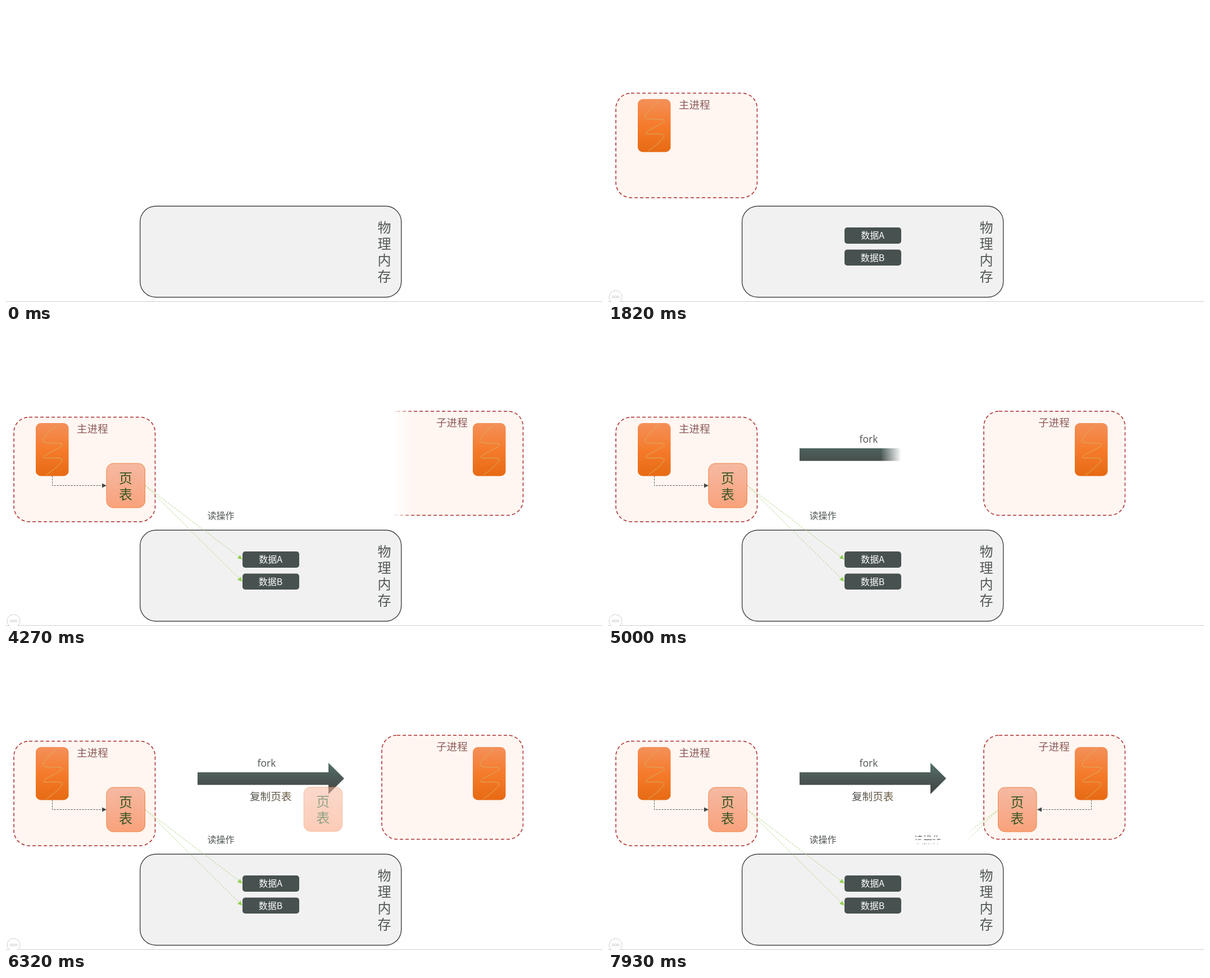
These frames come from a looping animation (1061x528 px, 8000 ms). An HTML page:

```html
<!DOCTYPE html>
<html lang="zh">
<head>
<meta charset="utf-8">
<title>fork</title>
<style>
html, body { margin: 0; width: 100%; height: 100%; overflow: hidden; background: #fff; }
svg { display: block; width: 1061px; height: 528px; }
text { font: 300 16px "Noto Sans CJK SC", "Noto Sans CJK", "Noto Sans CJK JP", sans-serif; fill: #505555; }
.big { font-size: 24px; text-anchor: middle; }
.name { font-size: 18.6px; fill: #8c5a58; }
.mid { text-anchor: middle; }
.panel { fill: #fff6f1; stroke: #ab2a2b; stroke-width: 1.5; stroke-dasharray: 6 4; }
.data rect { fill: #475150; }
.data text { fill: #fff; }

/* every part runs on the same 8 s clock */
.a { animation: 8s linear infinite both; }
.step { animation-timing-function: step-end; }

@keyframes menu { 0% { visibility: hidden } .875%, 100% { visibility: visible } }
@keyframes data { 0%, 15.6% { opacity: 0 } 22.6%, 100% { opacity: 1 } }
@keyframes page { 0%, 28.3% { opacity: 0 } 34.3%, 100% { opacity: 1 } }
@keyframes page2 { 0%, 83.4% { opacity: 0 } 90.5%, 100% { opacity: 1 } }

/* wipes: a unit-wide soft-edged sheet slides over the part */
@keyframes parent { 0%, 8.2% { transform: none } 15.4%, 100% { transform: translateX(1.14px) } }
@keyframes link { 0%, 34.3% { transform: none } 40.1%, 100% { transform: translateX(1.14px) } }
@keyframes reads { 0%, 40.2% { transform: none } 48.1%, 100% { transform: translateX(1.14px) } }
@keyframes child { 0%, 48.3% { transform: none } 54.6%, 100% { transform: translateX(1.14px) } }
@keyframes fork { 0%, 54.8% { transform: none } 60.8%, 100% { transform: translateX(1.14px) } }
@keyframes arrow { 0%, 54.75% { transform: none } 67.5%, 100% { transform: translateX(1.14px) } }
@keyframes copy { 0%, 71.4% { transform: none } 77.7%, 100% { transform: translateX(1.14px) } }
@keyframes link2 { 0%, 90.5% { transform: none } 96.75%, 100% { transform: translateX(1.14px) } }
@keyframes reads2 { 0%, 96.75% { transform: none } 100% { transform: translateX(.478px) } }

/* random bars */
@keyframes bars { 0% { transform: translateX(-2000px) } 40.2%, 100% { transform: none } }
@keyframes bars2 { 0% { transform: translateX(-2000px) } 96.75%, 100% { transform: none } }
@keyframes label { 0% { visibility: hidden } 40.2%, 100% { visibility: visible } }
@keyframes label2 { 0% { visibility: hidden } 96.75%, 100% { visibility: visible } }

@keyframes ghost { 0% { visibility: hidden } 71.8% { visibility: visible } 90.5%, 100% { visibility: hidden } }
@keyframes travel {
  0% { transform: none }
  72.4% { transform: none; animation-timing-function: cubic-bezier(.333, 0, .667, .333) }
  77.9% { transform: translate(257.5px, -.5px); animation-timing-function: cubic-bezier(.333, .667, .667, 1) }
  83.4%, 100% { transform: translate(515px, -1px) }
}
</style>
</head>
<body>
<svg viewBox="0 0 1061 528">
  <defs>
    <linearGradient id="soft">
      <stop offset=".877" stop-color="#fff"/>
      <stop offset="1" stop-color="#fff" stop-opacity="0"/>
    </linearGradient>
    <linearGradient id="orange" x2="0" y2="1">
      <stop stop-color="#f4905a"/>
      <stop offset=".5" stop-color="#f57b2b"/>
      <stop offset="1" stop-color="#e76a13"/>
    </linearGradient>
    <linearGradient id="peach" x2="0" y2="1">
      <stop stop-color="#f6b9a2"/>
      <stop offset="1" stop-color="#f9a27c"/>
    </linearGradient>
    <linearGradient id="slate" x2="0" y2="1">
      <stop stop-color="#54716c"/>
      <stop offset=".75" stop-color="#464c4a"/>
      <stop offset="1" stop-color="#434746"/>
    </linearGradient>
    <linearGradient id="ink">
      <stop stop-color="#535250"/>
      <stop offset="1" stop-color="#6b5a40"/>
    </linearGradient>
    <marker id="tip" markerUnits="userSpaceOnUse" markerWidth="9" markerHeight="9" refX="8" refY="4.5" orient="auto">
      <path d="M0 .5L8 4.5L0 8.5Z" fill="#454a4a"/>
    </marker>
    <marker id="greenTip" markerUnits="userSpaceOnUse" markerWidth="9" markerHeight="9" refX="8" refY="4.5" orient="auto">
      <path d="M0 .5L8 4.5L0 8.5Z" fill="#92d050"/>
    </marker>

    <g id="thread">
      <rect x="53" y="166" width="58.5" height="94.5" rx="9" fill="url(#orange)"/>
      <path d="M92 168C80 179 64 192 66 199C68 204 99 200 100.500 204C101 210 68 221 67 227C67 231 98 225 100 231C101 236 85 249 72 258.500" fill="none" stroke="#d9b266"/>
    </g>
    <g id="page">
      <rect x="179" y="238" width="68.5" height="79" rx="12" fill="url(#peach)" stroke="#ec8343"/>
      <text class="big" x="213" y="273" style="fill:#375623">页</text>
      <text class="big" x="213" y="301.500" style="fill:#375623">表</text>
    </g>
    <path id="link" d="M82.500 260.500V277.500H179" fill="none" stroke="#555" stroke-dasharray="3 2" marker-end="url(#tip)"/>
    <g id="reads" fill="none" stroke="#a5cf78" stroke-dasharray="3 2">
      <path d="M248 277.500L420.500 409" marker-end="url(#greenTip)"/>
      <path d="M248 277.500L420.500 448.500" marker-end="url(#greenTip)"/>
    </g>
    <rect id="sheet" x="-1.14" width="1.14" height="1" fill="url(#soft)"/>
    <clipPath id="bars"></clipPath>
    <clipPath id="bars2"></clipPath>
  </defs>
  <defs id="masks"></defs>

  <path d="M0 527.500H1061" stroke="#cdcdcd"/>
  <rect x="238.700" y="357" width="465" height="162.500" rx="28" fill="#f1f1f1" stroke="#414444" stroke-width="1.400"/>
  <g class="big">
    <text class="big" x="673.500" y="404">物</text>
    <text class="big" x="673.500" y="433">理</text>
    <text class="big" x="673.500" y="462">内</text>
    <text class="big" x="673.500" y="491">存</text>
  </g>

  <g mask="url(#parent)">
    <rect class="panel" x="14" y="155.500" width="251.500" height="186.500" rx="27"/>
    <use href="#thread"/>
    <text class="name" x="126" y="182.500">主进程</text>
  </g>
  <g mask="url(#child)">
    <rect class="panel" x="669" y="145" width="251.500" height="185.500" rx="27"/>
    <use href="#thread" x="778"/>
    <text class="name" x="766" y="172">子进程</text>
  </g>

  <g class="a data" style="animation-name:data">
    <rect x="421" y="395" width="101" height="29" rx="5"/>
    <text class="mid" x="471" y="415">数据A</text>
    <rect x="421" y="434.500" width="101" height="28.500" rx="5"/>
    <text class="mid" x="471" y="454.500">数据B</text>
  </g>

  <g class="a" style="animation-name:page"><use href="#page"/></g>
  <g mask="url(#linkWipe)"><use href="#link"/></g>
  <g mask="url(#readsWipe)"><use href="#reads"/></g>
  <g class="a step" style="animation-name:label"><text x="358.500" y="337" clip-path="url(#bars)">读操作</text></g>

  <g mask="url(#fork)"><text class="mid" x="464" y="200.500" style="font:400 17.5px 'Open Sans','Noto Sans',sans-serif">fork</text></g>
  <g mask="url(#arrow)"><path d="M341 211H574V194L602 222L574 250V233.500H341Z" fill="url(#slate)"/></g>
  <g mask="url(#copy)"><text x="434" y="261" style="font-size:18.600px;fill:url(#ink)">复制页表</text></g>

  <g class="a step" style="animation-name:ghost">
    <g class="a" style="animation-name:travel"><use href="#page" opacity=".55"/></g>
  </g>
  <g class="a" style="animation-name:page2"><use href="#page" x="515.500"/></g>
  <g transform="matrix(-1 0 0 1 943 0)">
    <g mask="url(#linkWipe2)"><use href="#link"/></g>
    <g mask="url(#readsWipe2)"><use href="#reads"/></g>
  </g>
  <g class="a step" style="animation-name:label2"><text x="545" y="337" clip-path="url(#bars2)">读操作</text></g>

  <g class="a step" style="animation-name:menu" fill="#fff" stroke="#cfcfcf">
    <circle cx="13.500" cy="519" r="11.500"/>
    <circle cx="9" cy="519" r="1.900"/>
    <circle cx="13.500" cy="519" r="1.900"/>
    <circle cx="18" cy="519" r="1.900"/>
  </g>
</svg>
<script>
const byId = id => document.getElementById(id);

// mask id, keyframes, start edge, signed width
const wipes = [
  ['parent', 'parent', 13, 253],
  ['child', 'child', 921.5, -253],
  ['linkWipe', 'link', 81, 99],
  ['linkWipe2', 'link2', 81, 99],
  ['readsWipe', 'reads', 247, 175],
  ['readsWipe2', 'reads2', 247, 175],
  ['fork', 'fork', 446, 36],
  ['arrow', 'arrow', 341, 261],
  ['copy', 'copy', 433, 77],
];
byId('masks').innerHTML = wipes.map(([id, anim, x, w]) =>
  `<mask id="${id}" maskUnits="userSpaceOnUse" x="0" y="0" width="1061" height="528">
    <g transform="translate(${x}) scale(${w} 528)"><use href="#sheet" class="a" style="animation-name:${anim}"/></g>
  </mask>`).join('');

// the order in which the bars from top to bottom turn on
const order = [8, 3, 1, 6, 10, 0, 4, 9, 5, 2, 7];
for (const id of ['bars', 'bars2']) {
  byId(id).innerHTML = order.map((rank, i) =>
    `<rect class="a step" x="340" y="${320 + 2 * i}" width="270" height="2"
      style="animation-name:${id};animation-delay:${rank * 55}ms"/>`).join('');
}
</script>
</body>
</html>
```
